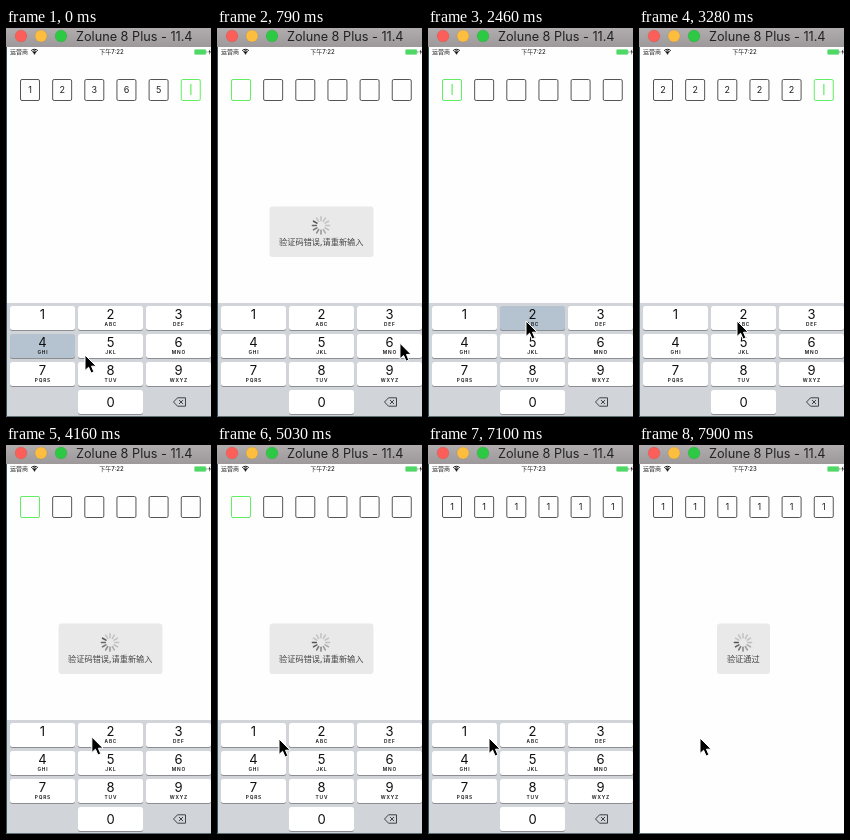
Write an HTML page that moves like this. It is 205 px wide and 389 px high and loops after 7.99 s.

```html
<!DOCTYPE html>
<html lang="zh">
<head>
<meta charset="utf-8">
<title>Code entry</title>
<style>
html, body { margin: 0; width: 100%; height: 100%; overflow: hidden; background: #fefefe; }
svg { display: block; width: 100%; height: 100%; }
text { font-family: Inter, "Noto Sans CJK SC", "Noto Sans CJK", sans-serif; text-anchor: middle; }
</style>
</head>
<body>
<svg id="stage" viewBox="0 0 205 389" preserveAspectRatio="none">
  <defs>
    <linearGradient id="bar" x1="0" y1="0" x2="0" y2="1">
      <stop offset="0" stop-color="#b1acae"/><stop offset="1" stop-color="#9d999a"/>
    </linearGradient>
    <clipPath id="screen"><rect x="1" y="19" width="204" height="369"/></clipPath>
  </defs>
</svg>
<script>
const LOOP = 7990;
const GREEN = '#62ee62';
const stage = document.getElementById('stage');

function add(parent, tag, attrs, text) {
  const el = document.createElementNS('http://www.w3.org/2000/svg', tag);
  set(el, attrs);
  if (text !== undefined) el.textContent = text;
  parent.appendChild(el);
  return el;
}
function set(el, attrs) {
  for (const k in attrs) el.setAttribute(k, attrs[k]);
}
const clamp = x => Math.max(0, Math.min(1, x));
const ramp = (t, from, ms) => clamp((t - from) / ms);
const ease = x => x * x * (3 - 2 * x);

// [key, pressed at, released at]
const rounds = [
  [[1, -900, -800], [2, -800, -700], [3, -700, -600], [6, -500, -400], [5, -300, -200], [4, -100, 30]],
  [[2, 2460, 2640], [2, 2730, 2810], [2, 2990, 3070], [2, 3130, 3190], [2, 3235, 3280], [2, 3400, 3450]],
  [[1, 5800, 5980], [1, 6080, 6180], [1, 6230, 6290], [1, 6370, 6520], [1, 6590, 6650], [1, 6720, 7100]]
];
const taps = rounds.flat();
const DONE = 7100;

// [time, x, y] of the pointer tip
const path = [
  [0, 79, 327], [150, 79, 327], [330, 100, 340], [480, 140, 343], [640, 188, 332], [820, 182, 312],
  [1100, 174, 305], [1400, 163, 297], [1600, 158, 294], [1740, 158, 294], [1880, 155, 297],
  [2060, 132, 298], [2250, 106, 295], [2380, 98, 293], [3880, 98, 293], [4100, 90, 292],
  [4350, 73, 292], [4580, 62, 294], [5550, 62, 294], [5570, 61, 293], [LOOP, 61, 293]
];

// window chrome and status bar
add(stage, 'rect', { width: 205, height: 389, fill: '#fefefe' });
add(stage, 'rect', { width: 205, height: 19, fill: 'url(#bar)' });
['#fc5f5a', '#fdbd3f', '#2ec944'].forEach((fill, i) =>
  add(stage, 'circle', { cx: 15 + 20 * i, cy: 8, r: 6, fill, stroke: '#0002', 'stroke-width': .5 }));
add(stage, 'text', { x: 70, y: 13, 'font-size': 12.7, fill: '#222', style: 'text-anchor:start' },
  'Zolune 8 Plus - 11.4');
add(stage, 'text', { x: 4, y: 26.2, 'font-size': 6, fill: '#222', style: 'text-anchor:start' }, '运营商');
[[1.6, 1.6], [3.2, 1], [4.8, 1]].forEach(([r, w]) => {
  const d = r * .7;
  add(stage, 'path', {
    d: `M${28.5 - d} ${26 - d}A${r} ${r} 0 0 1 ${28.5 + d} ${26 - d}`,
    fill: 'none', stroke: '#111', 'stroke-width': w
  });
});
add(stage, 'circle', { cx: 28.5, cy: 25.7, r: .8, fill: '#111' });
const clock = add(stage, 'text', { x: 105.5, y: 26, 'font-size': 6, 'font-weight': 500, fill: '#222' });
add(stage, 'rect', { x: 188.5, y: 21.5, width: 11.5, height: 5, rx: 1, fill: '#4cd964', stroke: '#8fdc9c', 'stroke-width': .6 });
add(stage, 'rect', { x: 200.5, y: 23, width: .8, height: 2, fill: '#999' });
add(stage, 'path', { d: 'M204.3 21L202.3 24.3H203.6L202.9 27L205 23.6H203.8Z', fill: '#222' });

// code boxes
const boxes = [...Array(6).keys()].map(i => {
  const x = 14.5 + i * 32.15;
  return {
    x,
    frame: add(stage, 'rect', { x, y: 51.5, width: 19, height: 21, rx: 1.5, fill: 'none', 'stroke-width': 1 }),
    digit: add(stage, 'text', { x: x + 9.5, y: 65.1, 'font-size': 9, fill: '#222' })
  };
});
const caret = add(stage, 'rect', { y: 56, width: 1.2, height: 11, fill: GREEN });

// keyboard
const clipped = add(stage, 'g', { 'clip-path': 'url(#screen)' });
const board = add(clipped, 'g', {});
add(board, 'rect', { x: 1, y: 275, width: 204, height: 114, fill: '#d1d5da' });
const letters = ['', 'ABC', 'DEF', 'GHI', 'JKL', 'MNO', 'PQRS', 'TUV', 'WXYZ'];
const keys = {};
function addKey(n, col, row, sub) {
  const x = 4 + col * 68, y = 278 + row * 28, mid = x + 32.5;
  add(board, 'rect', { x, y: y + 1, width: 65, height: 24, rx: 2.5, fill: '#8b8e93' });
  keys[n] = add(board, 'rect', { x, y, width: 65, height: 24, rx: 2.5 });
  add(board, 'text', { x: mid, y: y + (sub === null ? 16.5 : 13.3), 'font-size': 13, fill: '#111' }, n);
  if (sub) add(board, 'text', {
    x: mid + .4, y: y + 20.2, 'font-size': 4.8, 'font-weight': 600, 'letter-spacing': .8, fill: '#111'
  }, sub);
}
letters.forEach((sub, i) => addKey(i + 1, i % 3, Math.floor(i / 3), sub));
addKey(0, 1, 3, null);
add(board, 'path', {
  d: 'M167.5 374L171.5 369.8H179.5V378.2H171.5ZM173 372L177 376M177 372L173 376',
  fill: 'none', stroke: '#333', 'stroke-width': .9, 'stroke-linejoin': 'round'
});

// progress panels
function addHud(x, w, label, show, hide, ref) {
  const g = add(stage, 'g', {});
  add(g, 'rect', { x, y: 178.5, width: w, height: 50.5, rx: 3, fill: '#e9e9e9' });
  const spokes = [...Array(12).keys()].map(i => add(g, 'line', {
    x1: 104, x2: 104, y1: 192.8, y2: 188.9, stroke: '#555', 'stroke-width': 1.6,
    'stroke-linecap': 'round', transform: `rotate(${i * 30} 104 197.5)`
  }));
  add(g, 'text', { x: 104.3, y: 216.8, 'font-size': 8.2, 'font-weight': 500, fill: '#444' }, label);
  return { g, spokes, show, hide, ref };
}
const huds = [
  addHud(52.5, 104, '验证码错误,请重新输入', 100, 1850, 1690),
  addHud(52.5, 104, '验证码错误,请重新输入', 3460, 5050, 5020),
  addHud(78, 53, '验证通过', 7130, 9000, 7895)
];

// window edge and pointer
add(stage, 'rect', { y: 19, width: 1, height: 370, fill: '#31535c' });
add(stage, 'rect', { y: 388, width: 205, height: 1, fill: '#5d7176' });
const pointer = add(stage, 'path', {
  d: 'M0 0V15.5L3.6 12.2L6.1 18L8.9 16.8L6.5 11.2H11.2Z',
  fill: '#000', stroke: '#fff', 'stroke-width': 1, 'stroke-linejoin': 'round'
});

function pointerAt(t) {
  const i = Math.max(1, path.findIndex(p => p[0] > t));
  const [t0, x0, y0] = path[i - 1], [t1, x1, y1] = path[i];
  const k = (t - t0) / (t1 - t0);
  return [x0 + (x1 - x0) * k, y0 + (y1 - y0) * k];
}

function draw(t) {
  const typed = taps.filter(p => p[2] <= t);
  const done = t >= DONE;
  const code = done ? typed.slice(-6) : typed.slice(typed.length - typed.length % 6);
  boxes.forEach((b, i) => {
    b.digit.textContent = code[i] ? code[i][0] : '';
    b.frame.setAttribute('stroke', i === code.length ? GREEN : '#555');
  });

  const phase = (t - typed[typed.length - 1][2]) / 1000 % 1;
  const glow = phase < .9 ? 1 - ramp(phase, .45, .1) : ramp(phase, .9, .1);
  set(caret, { x: boxes[Math.min(code.length, 5)].x + 9, opacity: done ? 0 : glow });

  const held = taps.find(p => p[1] <= t && t < p[2]);
  for (const n in keys) keys[n].setAttribute('fill', held && held[0] == n ? '#b5c3d0' : '#fff');
  board.setAttribute('transform', `translate(0 ${115 * ease(ramp(t, DONE, 400))})`);
  clock.textContent = t < 6180 ? '下午7:22' : '下午7:23';

  for (const h of huds) {
    h.g.setAttribute('opacity', ramp(t, h.show, 300) * (1 - ramp(t, h.hide, 300)));
    const lead = 9 + Math.floor((t - h.ref) / (1000 / 12));
    h.spokes.forEach((s, i) => {
      const age = ((lead - i) % 12 + 12) % 12;
      s.setAttribute('opacity', Math.max(.25, 1 - age * .12));
    });
  }
  pointer.setAttribute('transform', `translate(${pointerAt(t)})`);
}

const start = performance.now();
function tick() {
  draw((performance.now() - start) % LOOP);
  requestAnimationFrame(tick);
}
tick();
</script>
</body>
</html>
```
